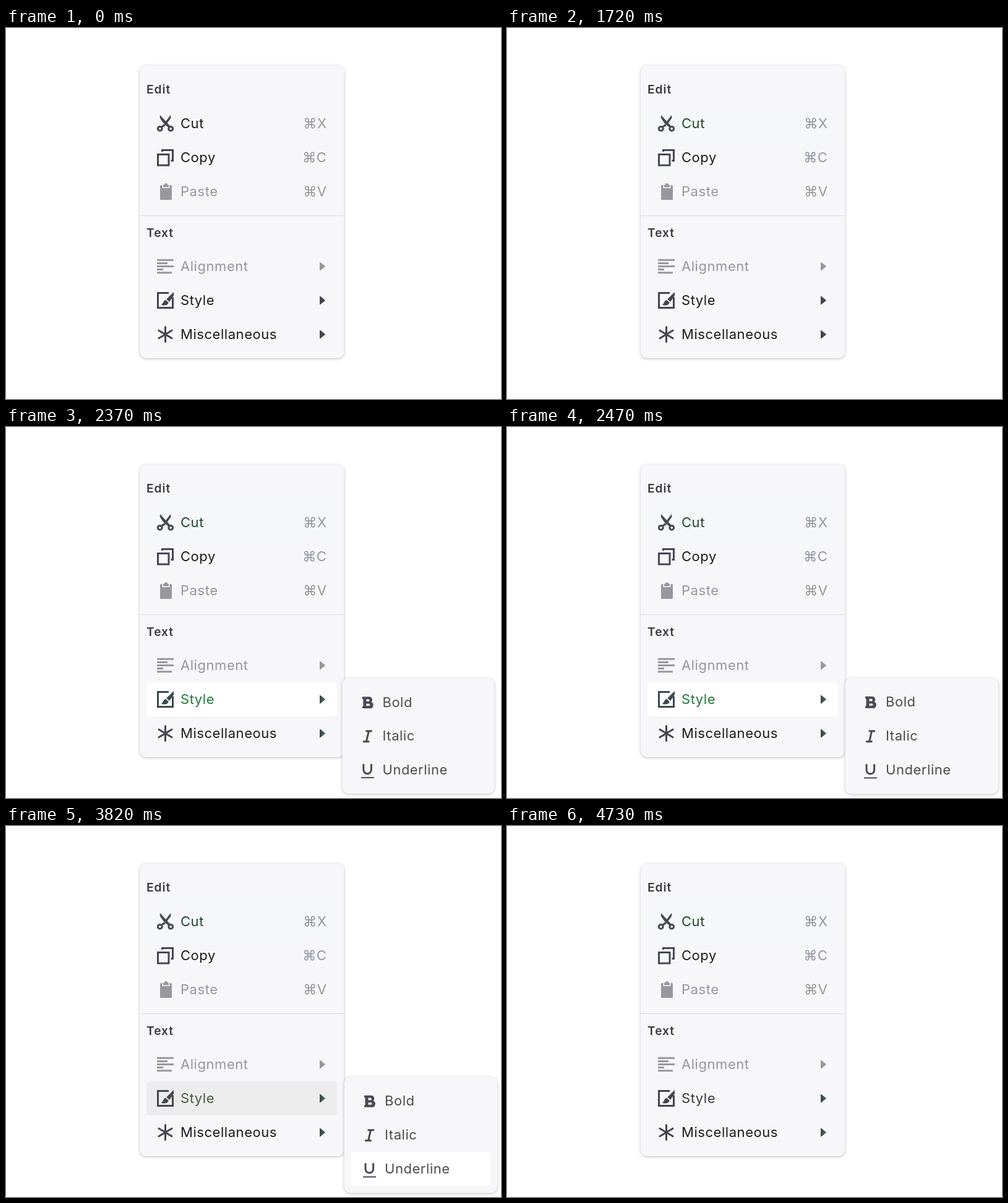
Recreate the animation shown at these times as an HTML page. Size 800 px wide and 600 px high, loop 5420 ms.

```html
<!DOCTYPE html>
<html lang="en">
<head>
<meta charset="utf-8">
<title>Context menu</title>
<style>
  html, body { margin: 0; width: 100%; height: 100%; overflow: hidden; background: #fff; }
  svg { display: block; }
  text { font: 400 22px Inter, sans-serif; letter-spacing: .025em; }
  .title { font-size: 19.25px; font-weight: 600; letter-spacing: .05em; fill: #3a3a42; }
  .panel { fill: #f7f7fa; filter: drop-shadow(0 1.5px 2px rgba(0, 0, 0, .26)); }
  .icon { color: var(--icon); fill: currentColor; }
  .line { fill: none; stroke: currentColor; stroke-width: 3; }
  .label { fill: var(--text); }
  .keys { fill: var(--keys); text-anchor: end; }
  .back { fill: var(--back); }
</style>
</head>
<body>
<svg width="800" height="600" viewBox="0 0 800 600">
  <defs>
    <linearGradient id="tint">
      <stop offset=".25" stop-color="#45444f"/>
      <stop offset=".6" stop-color="#2f6b50"/>
    </linearGradient>
  </defs>
  <rect class="panel" x="216" y="60.5" width="330.5" height="473.5" rx="11"/>
  <path d="M216 303.5H546.5" stroke="#dedee2"/>
  <text class="title" x="227" y="106">Edit</text>
  <text class="title" x="227" y="338">Text</text>
  <g id="menu"></g>
  <g id="submenu"><rect class="panel" x="546.5" y="405.5" width="247.5" height="188" rx="11"/></g>
</svg>
<script>
const LOOP = 5420;
const PLAIN = { back: 'none', text: '#1b1b1f', icon: '#45444f', keys: '#96969c' };
const SOFT = { ...PLAIN, text: '#4b4b50', icon: '#4a4954' };
const MUTED = { ...PLAIN, text: '#96959f', icon: '#98979f' };
const HOVER = { back: '#fff', text: '#1f7a3c', icon: '#3a4a4d', keys: '#8f9896' };

// Icons are drawn relative to the vertical centre of their row.
const icons = {
  cut: `<g class="line"><circle cx="248.8" cy="8.3" r="3.4"/><circle cx="266.2" cy="8.3" r="3.4"/></g>
    <path d="M249.2-13.5L266.2 5L263 6.6L256 1.5L249.6-7.5Q248-10.5 249.2-13.5Z
      M265.8-13.5Q267.2-10.5 265.5-7.5L260.6-.8L258.2-3.6Z M255.2 1L257.8 3.8L252 6.8L249 5.6Z"/>`,
  copy: `<path class="line" d="M245.5-5H263V12.5H245.5Z M252.5-9.5V-12H269.5V5H266.5"/>`,
  paste: `<rect x="249" y="-10.5" width="19" height="24" rx="1.5"/>
    <path d="M252.5-11.5V-5.5H264.5V-11.5Z" fill="#f7f7fa"/>
    <path d="M254-7V-11H256A2.5 2.5 0 0 1 261-11H263V-7Z"/>`,
  align: `<path class="line" d="M244-10.3H271M244-5H261M244 0H271M244 5H254M244 10.3H268"/>`,
  style: `<path class="line" d="M263-12H245.5V12H269.5V-5"/>
    <path d="M271-13.5V-7.5L264 2.5L259.3-2Z M258.2-.8L262.6 3.4C262 8 256 9 251 7.2C254 5.5 254 .2 258.2-.8Z"/>`,
  star: `<path class="line" d="M257.5-12V12M247-6.3L268 6.3M247 6.3L268-6.3" stroke-linecap="round"/>`,
  bold: `<path fill-rule="evenodd" d="M579-9H590A5 5 0 0 1 593.5-.3A5.4 5.4 0 0 1 590.5 10H579V6.5H580.5V-5.5H579Z
      M585.5-5H589A1.8 1.8 0 0 1 589-1.4H585.5Z M585.5 2.4H589.6A1.8 1.8 0 0 1 589.6 6H585.5Z"/>`,
  italic: `<path class="line" d="M584.5-8H595M580 9H590.5M589.5-8L585.5 9"/>`,
  underline: `<path class="line" d="M581-9.5V0A6.3 6.3 0 0 0 593.6 0V-9.5"/><path d="M577 11.7H598V13.7H577Z"/>`
};

const rows = {};

function addRow(parent, icon, label, y, base, { x = 227, width = 308, keys, arrow } = {}) {
  const row = document.createElementNS('http://www.w3.org/2000/svg', 'g');
  row.setAttribute('transform', `translate(0 ${y})`);
  row.innerHTML = `<rect class="back" x="${x}" y="-27.5" width="${width}" height="55" rx="5"/>
    <g class="icon">${icons[icon]}</g>
    <text class="label" x="${x + 55}" y="7.5">${label}</text>` +
    (keys ? `<text class="keys" x="518.5" y="7.5">⌘${keys}</text>` : '') +
    (arrow ? '<path class="icon arrow" d="M507-6.6Q507-7.4 507.8-6.8L515.6-.6Q516.3 0 515.6.6L507.8 6.8Q507 7.4 507 6.6Z"/>' : '');
  parent.append(row);
  rows[icon] = { row, base };
}

const menu = document.getElementById('menu');
const submenu = document.getElementById('submenu');
addRow(menu, 'cut', 'Cut', 154.5, PLAIN, { keys: 'X' });
addRow(menu, 'copy', 'Copy', 209.5, PLAIN, { keys: 'C' });
addRow(menu, 'paste', 'Paste', 264.5, MUTED, { keys: 'V' });
addRow(menu, 'align', 'Alignment', 385.5, MUTED, { arrow: true });
addRow(menu, 'style', 'Style', 440.5, PLAIN, { arrow: true });
addRow(menu, 'star', 'Miscellaneous', 495.5, PLAIN, { arrow: true });
['Bold', 'Italic', 'Underline'].forEach((label, i) =>
  addRow(submenu, label.toLowerCase(), label, 444.8 + 55 * i, SOFT, { x: 557, width: 226 }));

// Row changes: time, row, new look.
const cues = [
  [610, 'cut', HOVER],
  [1200, 'cut', { back: '#f5f7fb', text: '#1f472c', icon: '#464a4d' }],
  [1200, 'copy', HOVER],
  [1720, 'copy', { back: 'none', text: '#1b1c22', icon: '#454858', keys: '#9296a2' }],
  [1970, 'style', HOVER],
  [2800, 'style', { back: '#ececed', text: '#48593f', icon: '#43484a' }],
  [2850, 'bold', { back: '#fff', text: '#40544a' }],
  [3340, 'bold', SOFT],
  [3340, 'italic', { back: '#fff', text: '#40544a' }],
  [3820, 'italic', { back: 'none', text: '#474d4b' }],
  [3820, 'underline', { back: '#fff', text: '#4c4c4e' }],
  [4580, 'style', { back: 'none', text: '#3a3a3c', icon: '#45444f' }]
];

// CSS "ease": cubic-bezier(.25, .1, .25, 1)
function ease(x) {
  x = Math.min(1, Math.max(0, x));
  const bezier = (a, b, s) => 3 * a * s * (1 - s) ** 2 + 3 * b * s * s * (1 - s) + s ** 3;
  let low = 0, high = 1;
  for (let i = 0; i < 20; i++) {
    const mid = (low + high) / 2;
    if (bezier(.25, .25, mid) < x) low = mid; else high = mid;
  }
  return bezier(.1, 1, low);
}

function draw(t) {
  for (const [name, { row, base }] of Object.entries(rows)) {
    const look = { ...base };
    for (const [time, target, change] of cues)
      if (target === name && t >= time) Object.assign(look, change);
    for (const key in look) row.style.setProperty('--' + key, look[key]);
  }
  for (const name of ['style', 'star'])
    rows[name].row.querySelector('.arrow').style.fill = t >= 2190 ? 'url(#tint)' : '';

  const open = t < 4580 ? ease((t - 2165) / 300) : 1 - ease((t - 4565) / 165);
  const rest = 1 - open;
  submenu.style.opacity = t < 2190 ? 0 : Math.min(1, open * 1.6);
  submenu.setAttribute('transform',
    `translate(${670 - 57 * rest} 499.5) scale(${1 - .095 * rest}) translate(-670 -499.5)`);
}

function tick() {
  draw(performance.now() % LOOP);
  requestAnimationFrame(tick);
}
tick();
</script>
</body>
</html>
```
